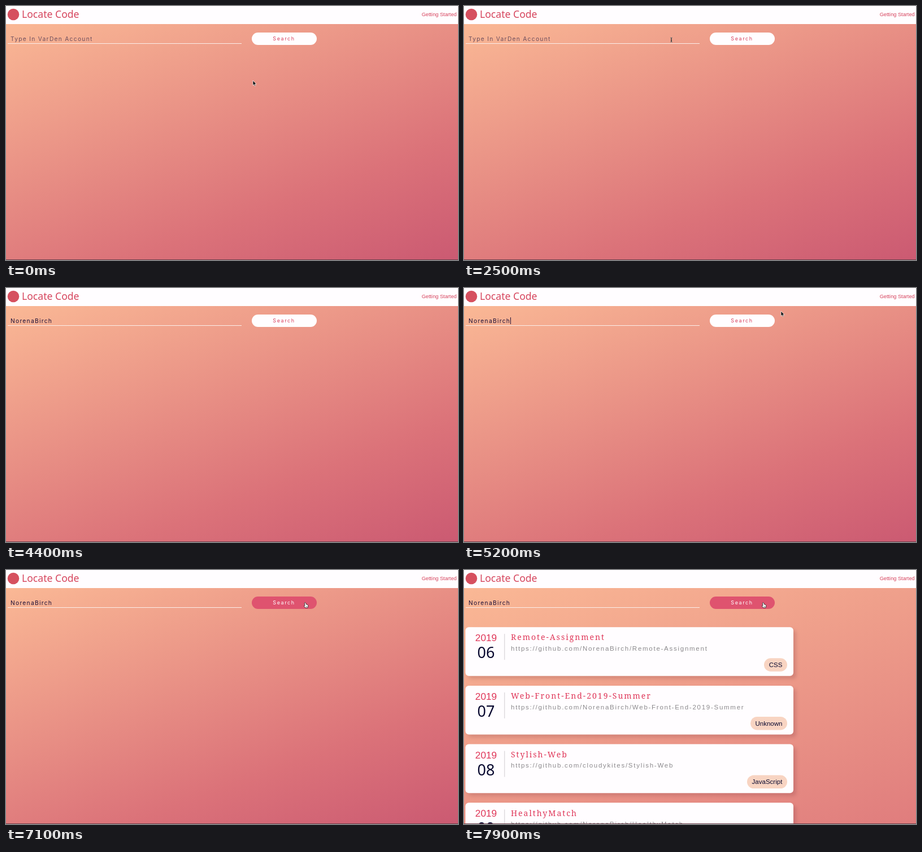
Write an HTML page that moves like this. It is 800 by 450 pixels and loops after 8000 ms.

```html
<!DOCTYPE html>
<html lang="en">
<head>
<meta charset="utf-8">
<title>Repository search</title>
<style>
  html, body { margin: 0; width: 100%; height: 100%; overflow: hidden; }
  #stage {
    position: relative; width: 800px; height: 450px; overflow: hidden;
    background: linear-gradient(160deg, #fab895, #db7279 70%, #cb5a72) 0 32px / 100% 418px no-repeat;
    animation: grow 8s step-end infinite;
  }
  svg { position: absolute; left: 0; top: 0; }
  .sans { font-family: "Liberation Sans", Arial, sans-serif; }
  .ui { font-family: Inter, sans-serif; }
  .brand { font: 17.6px "Noto Sans", sans-serif; fill: #d6455d; }
  .nav { font-size: 9.22px; fill: #d6425c; text-anchor: end; }

  .field {
    position: absolute; left: 8px; top: 50px; height: 16px; line-height: 16px;
    font-size: 10.24px; letter-spacing: 1.28px; color: #1c1038; white-space: pre;
  }
  .hint { position: absolute; left: 0; top: 0; color: #6d4f5e; }
  .caret {
    position: absolute; left: 100%; top: 2px; width: 1px; height: 12px;
    background: #1c1038; opacity: 0; animation: blink 8s step-end infinite;
  }

  .button {
    position: absolute; left: 434.5px; top: 46.5px; width: 115px; height: 22px;
    border-radius: 11px; line-height: 22px; text-align: center;
    font-size: 9px; letter-spacing: 1.6px; color: #d8405d; background: #fffdff;
    animation: hover 8s linear infinite;
  }

  #results { visibility: hidden; animation: reveal 8s step-end infinite; }
  .card { fill: #fffdff; filter: drop-shadow(5px 5px 3px rgba(110, 40, 50, .2)); }
  .year { font-size: 17.28px; fill: #df3557; text-anchor: middle; }
  .month { font: 500 27px "Noto Sans", sans-serif; fill: #08082f; text-anchor: middle; }
  .name { font: 500 14px "Noto Serif", serif; letter-spacing: 2px; fill: #df3557; }
  .link { font-size: 11.52px; letter-spacing: .15em; fill: #8b898c; }
  .tag { font-size: 11.52px; fill: #08082f; text-anchor: middle; }

  #pointer { animation: move 8s ease-in-out infinite; }
  #pointer g { opacity: 0; animation: 8s step-end infinite; }
  #pointer .arrow { animation-name: arrow; }
  #pointer .beam { animation-name: beam; }
  #pointer .hand { animation-name: hand; }

  @keyframes grow { 92.5%, 100% { background-size: 100% 900px; } }
  @keyframes reveal { 92.5%, 100% { visibility: visible; } }
  @keyframes blink {
    0%, 18.75%, 31.25%, 53.75%, 66.25%, 78.75%, 100% { opacity: 0; }
    12.5%, 25%, 37.5%, 58.75%, 72.5% { opacity: 1; }
  }
  @keyframes hover {
    0%, 68.5% { color: #d8405d; background: #fffdff; }
    72%, 100% { color: #fffdff; background: #df536f; }
  }
  @keyframes move {
    0%, 1.25% { transform: translate(437px, 132px); }
    10%, 61.25% { transform: translate(367px, 60px); }
    65% { transform: translate(561px, 41px); }
    71.25% { transform: translate(540px, 55px); }
    81.25%, 100% { transform: translate(530px, 58px); }
  }
  @keyframes arrow { 0%, 62.5% { opacity: 1; } 7.5%, 68.5%, 100% { opacity: 0; } }
  @keyframes beam { 0%, 41.25%, 62.5%, 100% { opacity: 0; } 7.5%, 61.25% { opacity: 1; } }
  @keyframes hand { 0% { opacity: 0; } 68.5%, 100% { opacity: 1; } }
</style>
</head>
<body>
<div id="stage">
  <svg width="800" height="450" viewBox="0 0 800 450">
    <rect width="800" height="32" fill="#fffdff"/>
    <circle cx="13" cy="15" r="10.3" fill="#d6505f"/>
    <text class="brand" x="28" y="21">Locate Code</text>
    <text class="nav sans" x="797.7" y="18">Getting Started</text>
    <path d="M3 66.5H417" stroke="#fbeeea"/>
    <g id="results"></g>
    <path d="M0 449.5H800" stroke="#6b3f4b"/>
  </svg>

  <div class="field ui"><span class="hint">Type In VarDen Account</span><span id="typed"></span><i class="caret"></i></div>
  <div class="button ui">Search</div>

  <svg width="800" height="450" viewBox="0 0 800 450">
    <g id="pointer">
      <g class="arrow">
        <path d="M0 0V8.6L2 6.9 3.3 9.8 4.8 9.1 3.5 6.3H6.1Z" fill="#111" stroke="#fff" stroke-width=".7"/>
      </g>
      <g class="beam" fill="none">
        <path d="M-1.7-4Q0-4 0-3V3Q0 4-1.7 4M1.7-4Q0-4 0-3V3Q0 4 1.7 4" stroke="#fff" stroke-width="1.6" opacity=".5"/>
        <path d="M-1.7-4Q0-4 0-3V3Q0 4-1.7 4M1.7-4Q0-4 0-3V3Q0 4 1.7 4M-1 1H1" stroke="#222" stroke-width=".8"/>
      </g>
      <g class="hand">
        <path d="M-1.2 0Q0-.9.6.5L1.2 2.8 4 3.5Q5 4 4.7 6L4 9H-.2L-2.8 5.7Q-2.8 4.4-.9 5.2L-1.7 1Z" fill="#fff" stroke="#222" stroke-width=".8"/>
        <path d="M1 6V8M2.5 6V8" stroke="#222" stroke-width=".5"/>
      </g>
    </g>
  </svg>
</div>

<script>
  const LOOP = 8000, TYPE_START = 3300, KEY_TIME = 55;
  const account = "NorenaBirch";
  const repos = [
    { month: "06", name: "Remote-Assignment", owner: account, tag: "CSS", tagWidth: 41 },
    { month: "07", name: "Web-Front-End-2019-Summer", owner: account, tag: "Unknown", tagWidth: 65 },
    { month: "08", name: "Stylish-Web", owner: "cloudykites", tag: "JavaScript", tagWidth: 71 },
    { month: "09", name: "HealthyMatch", owner: account, tag: "JavaScript", tagWidth: 71 }
  ];

  const card = ({ month, name, owner, tag, tagWidth }, i) => `
    <g transform="translate(0 ${101.2 + i * 103.7})">
      <rect class="card" x="2.5" width="580.5" height="86.6" rx="6"/>
      <text class="year sans" x="39" y="25">2019</text>
      <text class="month" x="39" y="55">${month}</text>
      <path d="M71.8 12V58" stroke="#cfcbd0"/>
      <text class="name" x="83" y="23.3">${name}</text>
      <text class="link sans" x="83" y="41.8">https://github.com/${owner}/${name}</text>
      <rect x="${572 - tagWidth}" y="55" width="${tagWidth}" height="23.5" rx="11.75" fill="#f8d4c2"/>
      <text class="tag sans" x="${572 - tagWidth / 2}" y="70.8">${tag}</text>
    </g>`;
  document.getElementById("results").innerHTML = repos.map(card).join("");

  const typed = document.getElementById("typed");
  const hint = document.querySelector(".hint");

  function render(now) {
    const t = now % LOOP;
    const count = Math.max(0, Math.floor((t - TYPE_START) / KEY_TIME) + 1);
    typed.textContent = account.slice(0, count);
    hint.style.visibility = count ? "hidden" : "visible";
    requestAnimationFrame(render);
  }
  render(performance.now());
</script>
</body>
</html>
```
